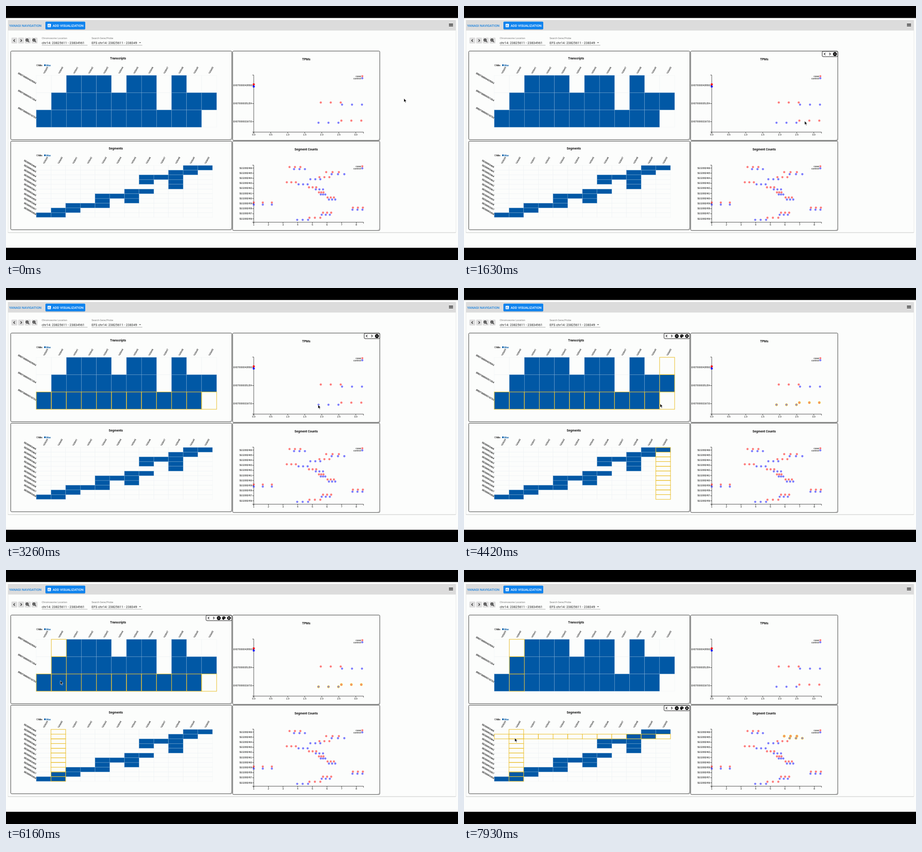
An HTML page that plays this animation: 998x561 px, repeating every 8 s.

```html
<!DOCTYPE html>
<html lang="en">
<head>
<meta charset="utf-8">
<title>Genome navigation</title>
<style>
  html, body { margin: 0; width: 100%; height: 100%; overflow: hidden; background: #000; }
  svg { display: block; width: 100%; height: 100%; }
  text { font-family: Roboto, sans-serif; fill: #222; white-space: pre; }
  .title { font-size: 6.9px; font-weight: 700; text-anchor: middle; fill: #111; }
  .key { font-size: 5.1px; font-weight: 700; }
  .col { font-size: 5.1px; font-weight: 500; }
  .row { font-size: 5.2px; font-weight: 700; text-anchor: end; }
  .axis, .tick { font-family: "Liberation Sans", Arial, sans-serif; fill: #000; }
  .axis { font-size: 4.7px; text-anchor: end; }
  .tick { font-size: 5.2px; text-anchor: middle; }
  .case { fill: #f00; fill-opacity: .5; }
  .control { fill: #00f; fill-opacity: .5; }
  .cell { fill: none; stroke: #eef1f3; stroke-width: .5; }
  .cell.on { fill: #0158a5; stroke: #8fb5d8; stroke-width: .45; }
  .lit { fill: none; stroke: #ecc232; stroke-width: 1.1; }
  .line { fill: none; stroke: #000; stroke-width: .7; }
  .icon { fill: none; stroke: #111; stroke-width: 1.2; }
  .label { font-size: 5.46px; letter-spacing: .03px; fill: #777; }
  .value { font-size: 7.28px; letter-spacing: .06px; }
  .brand { font-size: 7.4px; font-weight: 500; fill: #1e83dd; }
  .button { font-size: 7.28px; font-weight: 500; fill: #fff; }
</style>
</head>
<body>
<svg viewBox="0 0 998 561" preserveAspectRatio="none">
  <g id="page"></g>
  <g id="hover"></g>
  <path id="cursor" d="M0 0V8.3L1.9 6.6L3.3 9.7L4.7 9.1L3.3 6.1H5.9Z" fill="#000" stroke="#fff" stroke-width=".7"/>
</svg>
<script>
const LOOP = 8000;
const STEP = 62; // the pointer is sampled at this interval
const START = { x: 878.5, y: 204 };
const MOVES = [
  { from: 190, to: 1090, x: 773.5, y: 252 },
  { from: 1280, to: 2310, x: 714, y: 257.5 },
  { from: 2370, to: 3260, x: 689, y: 258 },
  { from: 3750, to: 4420, x: 433, y: 255.5 },
  { from: 4470, to: 5110, x: 229, y: 242 },
  { from: 5180, to: 6160, x: 120, y: 244.5 },
  { from: 6900, to: 7930, x: 112, y: 371 }
];

const range = (n, f) => Array.from({ length: n }, (_, i) => f(i));
const many = (list, f) => list.map(f).join('');
const rect = (x, y, w, h, attrs = '') => `<rect x="${x}" y="${y}" width="${w}" height="${h}" ${attrs}/>`;
const text = (x, y, cls, s, attrs = '') => `<text x="${x}" y="${y}" class="${cls}" ${attrs}>${s}</text>`;
const path = (d, cls = 'line', attrs = '') => `<path d="${d}" class="${cls}" ${attrs}/>`;
const circle = (x, y, r, cls, attrs = '') => `<circle cx="${x}" cy="${y}" r="${r}" class="${cls}" ${attrs}/>`;
const turned = (x, y, angle, cls, s) => text(0, 0, cls, s, `transform="translate(${x} ${y}) rotate(${angle})"`);
const chevron = (x, y, dir) => path(`M${x - dir * 1.3} ${y - 2.6}l${dir * 2.6} 2.6l${-dir * 2.6} 2.6`, 'icon');

const COLUMNS = range(12, i => 165639 + i);
const GENES = ['ENST00000429593', 'ENST00000351354', 'ENST00000216733'];
const SEGMENTS = range(11, i => 'SEG00' + (92466 - i));

const PANELS = range(4, k => {
  const y = 99.5 + (k >> 1) * 199;
  return k % 2 ? { x: 500.5, y, w: 324.8, h: 197.3, tools: 3 } : { x: 10.5, y, w: 488, h: 195.7, tools: 5 };
});

// Rows are separated by spaces; each lists the column ranges it covers.
const parseRows = s => s.split(' ').map(row => row.split(',').map(part => part.split('-').map(Number)));
const covers = (row, col) => row.some(([a, b = a]) => col >= a && col <= b);

const HEATMAPS = [
  { title: 'Transcripts', tx: 247.5, y: 153.1, w: 33.18, h: 38.25, names: GENES,
    rows: parseRows('3-5,7-8,10 2-8,10-12 1-11') },
  { title: 'Segments', tx: 242.5, y: 352.1, w: 32.42, h: 10.43, names: SEGMENTS,
    rows: parseRows('11-12 10-11 8-10 8,10 10 7-8 5-7 5,7 3-5 2-3 1-2') }
];
const GRID_X = 66.9;

// Groups per row: middle of the case dots, middle of the control dots, spread.
const PLOTS = [
  { title: 'TPMs', top: 152.5, first: 175.5, gap: 40, names: GENES,
    ticks: range(7, i => (i / 2).toFixed(1)), step: 37.55,
    groups: [[547, 547, 0], [717, 764, 22], [762.5, 712, 22]] },
  { title: 'Segment Counts', top: 351.5, first: 358, gap: 11.2, names: SEGMENTS,
    ticks: range(8, i => i + 1), step: 32.35,
    groups: [[638, 648, 12], [721, 733, 14], [703, 683, 11], [630, 656, 10], [677, 692, 8], [696, 700, 5],
             [717, 720, 7], [567, 567, 20], [777, 776, 11], [709, 706, 9], [682, 655, 12]] }
];
for (const p of PLOTS) {
  p.dots = p.groups.map(([caseMid, controlMid, spread], row) => range(6, i => ({
    x: (i < 3 ? caseMid : controlMid) + (i % 3 - 1) * spread,
    y: p.first + row * p.gap + (i < 3 ? -2.3 : 2.3),
    kind: i < 3 ? 'case' : 'control'
  })));
}

function header() {
  const magnifier = x => circle(x - 1, 75.2, 2.5, 'icon') + path(`M${x + 1} 77.2l2.5 2.6M${x - 2.2} 75.2h2.4`, 'icon');
  return rect(0, 26.5, 998, 507.5, 'fill="#fcfdfc"')
    + rect(4, 31, 989.5, 470.3, 'rx="1.5" fill="#d5d6d5"')
    + rect(4.5, 31, 988.5, 468.8, 'rx="1" fill="#fcfdfc"')
    + rect(4.5, 31, 988.5, 23.2, 'fill="#dcdcdc"')
    + text(7, 45.6, 'brand', 'YANAGI NAVIGATION')
    + rect(87, 35.3, 88, 17.2, 'rx="2" fill="#b5b9bd"')
    + rect(87, 34.6, 88, 17, 'rx="2" fill="#0f83ee"')
    + rect(91.8, 39.4, 7.4, 7.4, 'rx="1" fill="#fff"')
    + path('M93.6 45.2v-2.8M95.5 45.2v-4.2M97.4 45.2v-1.5', '', 'stroke="#0f83ee" stroke-width=".9"')
    + text(103, 45.7, 'button', 'ADD VISUALIZATION')
    + path('M978 39.7h9M978 42.1h9M978 44.5h9', 'icon')
    + many(range(4, i => 12 + i * 14.9), x => rect(x, 69.8, 12.8, 13, 'rx="1.5" fill="#dcdcdc"'))
    + chevron(18.2, 76.2, -1) + chevron(33.4, 76.2, 1) + magnifier(47.5) + magnifier(62.7)
    + text(79, 73.2, 'label', 'Chromosome Location')
    + text(79, 83.5, 'value', 'chr14: 23825611 - 23834961')
    + text(189, 73.2, 'label', 'Search Gene/Probe')
    + '<clipPath id="field"><path d="M189 74h101v12H189z"/></clipPath>'
    + text(189, 83.5, 'value', 'EFS chr14: 23825611 - 23834961', 'clip-path="url(#field)"')
    + path('M293.7 80h4.4l-2.2 2.3z', '', 'fill="#666"')
    + path('M79 86.6h101M189 86.6h112', '', 'stroke="#777" stroke-width=".6"');
}

function panelFrame({ x, y, w, h }) {
  const r = x + w, b = y + h;
  return rect(x, y, w, h, 'rx="2" fill="#fcfdfc" stroke="#222" stroke-width=".9"')
    + path(`M${r - 4} ${b - 1}l3 -3M${r - 2} ${b - 1}l1 -1`, '', 'stroke="#777" stroke-width=".5"');
}

const cellRect = (m, col, row, cls) =>
  rect(GRID_X + col * m.w, m.y + row * m.h, m.w, m.h, `class="${cls}"`);

function eachCell(m, draw) {
  return many(m.rows, (_, row) => many(COLUMNS, (_, col) => draw(col, row)));
}

function heatmap(m) {
  const keyY = m.y - 20.4;
  const isOn = (col, row) => covers(m.rows[row], col + 1);
  return text(m.tx, m.y - 34.7, 'title', m.title)
    + circle(69, keyY - 1.9, 1.7, '', 'fill="#fff" stroke="#222" stroke-width=".6"')
    + text(71.5, keyY, 'key', 'Min')
    + circle(86, keyY - 1.9, 2, '', 'fill="#0158a5"')
    + text(89, keyY, 'key', 'Max', 'style="fill:#0158a5"')
    + many(COLUMNS, (c, i) => turned(GRID_X + (i + .54) * m.w, m.y - 2.5, -60, 'col', c))
    + many(m.names, (name, j) => turned(65.5, m.y + (j + .5) * m.h + .3, 30, 'row', name))
    + eachCell(m, (col, row) => isOn(col, row) ? '' : cellRect(m, col, row, 'cell'))
    + eachCell(m, (col, row) => isOn(col, row) ? cellRect(m, col, row, 'cell on') : '');
}

function plot(p) {
  const bottom = p.top + 126;
  return text(662.8, p.top - 32.3, 'title', p.title)
    + path(`M544 ${p.top}H547V${bottom}H544M547 ${bottom + 3}V${bottom}H789.3V${bottom + 3}`)
    + many(p.ticks, (t, i) => path(`M${547 + i * p.step} ${bottom}v3`) + text(547 + i * p.step, bottom + 7.2, 'tick', t))
    + many(p.names, (name, j) => {
        const y = p.first + j * p.gap;
        return path(`M544 ${y}h3`) + text(543.3, y + 1.6, 'axis', name);
      })
    + many(p.dots.flat(), d => circle(d.x, d.y, 2.4, d.kind))
    + many(['case', 'control'], (name, i) => {
        const y = p.top + 2.6 + i * 4.5;
        return text(784, y + 1.9, 'axis', name, 'style="font-size:5.7px"') + circle(786.8, y, 2.3, name);
      });
}

function toolbar({ x, y, w, tools }) {
  const width = tools * 11.2 + .8, left = x + w - width, cy = y + 6.6;
  const at = i => left + 5.7 + i * 11.2;
  let out = rect(left, y + .5, width, 11.9, 'rx="2" fill="#fff" stroke="#111" stroke-width="1"')
    + chevron(at(0), cy, -1) + chevron(at(1), cy, 1)
    + circle(at(2), cy, 4.3, '', 'fill="#000"')
    + path(`M${at(2) - 2.2} ${cy}h4.4`, '', 'stroke="#fff" stroke-width="1"');
  if (tools === 5) {
    const px = at(3), gx = at(4);
    const holes = range(4, i => Math.PI * (1.03 + i * .31));
    out += path(`M${px} ${cy - 3.9}a3.9 3.9 0 0 0 0 7.8c1.2 0 .8 -1 .6 -1.6c0 -.6 .5 -.7 1 -.7c1.5 0 2.4 -.8 2.4 -2c0 -2 -1.8 -3.5 -4 -3.5z`, '', 'fill="#000"')
      + many(holes, a => circle(px + 2.3 * Math.cos(a), cy + 2.3 * Math.sin(a), .6, '', 'fill="#fff"'))
      + circle(gx, cy, 2.4, '', 'fill="none" stroke="#000" stroke-width="1.9"')
      + circle(gx, cy, 3.6, '', 'fill="none" stroke="#000" stroke-width="1.4" stroke-dasharray="1.6 1.23"');
  }
  return out;
}

function cellAt(m, x, y) {
  const col = Math.floor((x - GRID_X) / m.w), row = Math.floor((y - m.y) / m.h);
  return COLUMNS[col] && m.rows[row] ? { col, row } : null;
}

const litCells = (m, litCol, litRow) =>
  eachCell(m, (col, row) => col === litCol || row === litRow ? cellRect(m, col, row, 'lit') : '');
const litDots = dots => many(dots, d => circle(d.x, d.y, 2.3, 'lit'));

// Hovering a cell lights its row, its column in both heatmaps and its dots; hovering a dot lights its row.
function hoverLayer(x, y) {
  const panel = PANELS.find(p => x >= p.x && x <= p.x + p.w && y >= p.y && y <= p.y + p.h);
  let out = panel ? toolbar(panel) : '';
  HEATMAPS.forEach((m, k) => {
    const { dots } = PLOTS[k];
    const cell = cellAt(m, x, y);
    if (cell) out += litCells(m, cell.col, cell.row) + litCells(HEATMAPS[1 - k], cell.col) + litDots(dots[cell.row]);
    const row = dots.findIndex(group => group.some(d => Math.hypot(x - d.x, y - d.y) < 2.8));
    if (row >= 0) out += litCells(m, -1, row);
  });
  return out;
}

function cursorAt(t) {
  let { x, y } = START;
  for (const move of MOVES) {
    if (t < move.from) break;
    const elapsed = (Math.floor((t - move.from) / STEP) + 1) * STEP;
    const done = Math.min(1, elapsed / (move.to - move.from));
    x += (move.x - x) * done;
    y += (move.y - y) * done;
  }
  return [x, y];
}

const hover = document.getElementById('hover');
const cursor = document.getElementById('cursor');
document.getElementById('page').innerHTML =
  header() + many(PANELS, panelFrame) + many(HEATMAPS, heatmap) + many(PLOTS, plot);

let last = '';
function draw() {
  const [x, y] = cursorAt(performance.now() % LOOP);
  const place = `translate(${x} ${y})`;
  if (place !== last) {
    last = place;
    cursor.setAttribute('transform', place);
    hover.innerHTML = hoverLayer(x, y);
  }
  requestAnimationFrame(draw);
}
draw();
</script>
</body>
</html>
```
